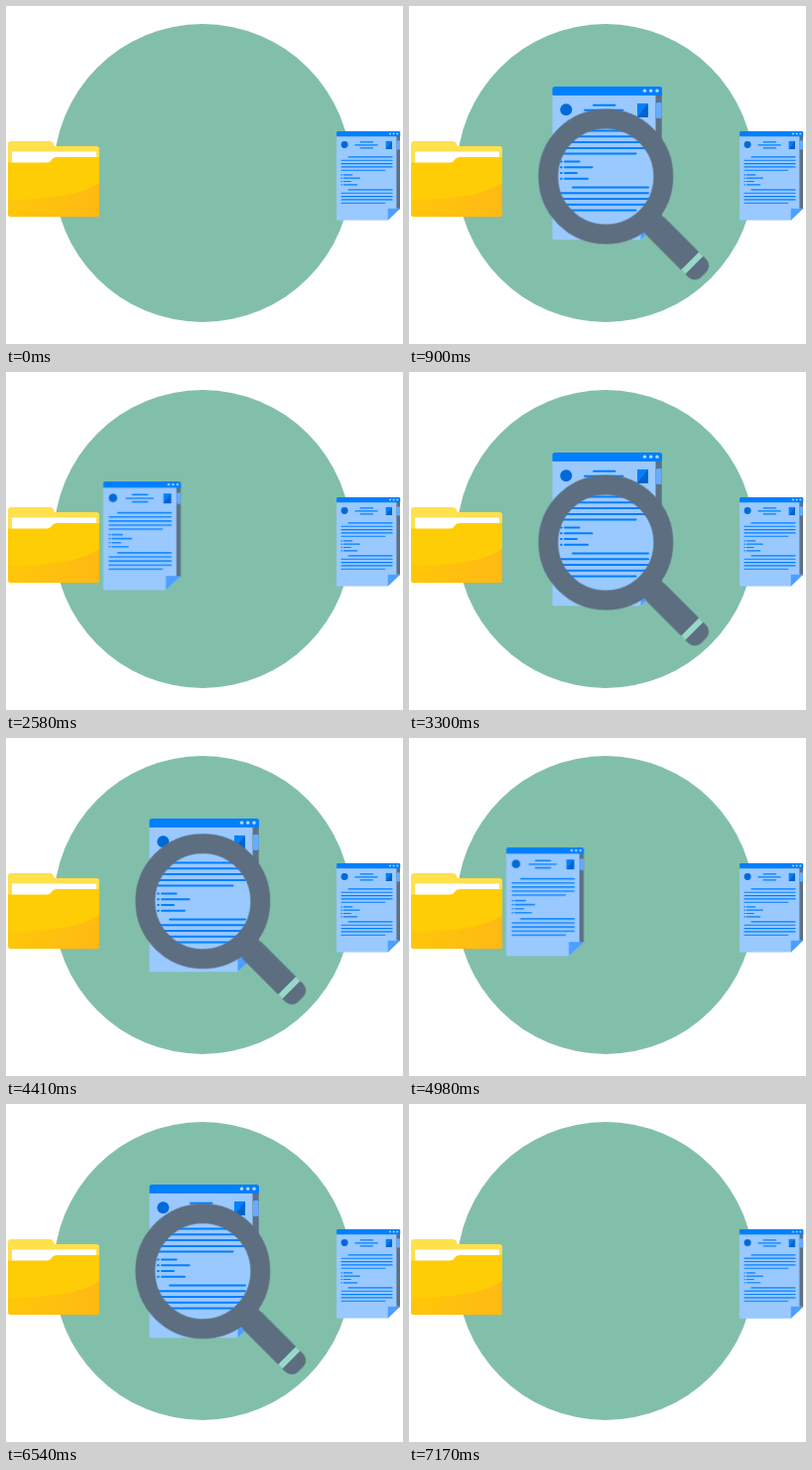
An HTML page that plays this animation: 400x340 px, repeating every 7200 ms.

```html
<!DOCTYPE html>
<html lang="en">
<head>
<meta charset="utf-8">
<title>Document search</title>
<style>
  html, body { margin: 0; width: 100%; height: 100%; overflow: hidden; background: #fff; }
  svg { display: block; width: 400px; height: 340px; }

  .doc { transform-origin: 199.5px 158px; }
  .filed { transform: translate(165.5px, 12.7px) scale(.58); }
  .moving { animation: travel 2400ms ease-in-out infinite, reveal 2400ms linear infinite; }
  .bob { animation: bob 2400ms ease-in-out infinite; }
  .pop { transform-origin: 216px 178px; animation: pop 2400ms ease-out infinite; }

  @keyframes travel {
    0% { transform: translate(-150px, 16px) scale(.3); }
    13.75%, 87.1% { transform: none; }
    98.75%, 100% { transform: translate(165.5px, 12.7px) scale(.58); }
  }
  @keyframes reveal {
    0% { opacity: 0; }
    3.75%, 100% { opacity: 1; }
  }
  @keyframes bob {
    0%, 12.5%, 50%, 87.5%, 100% { transform: translateY(0); }
    21.875%, 59.375% { transform: translateY(-13px); }
    40.625%, 78.125% { transform: translateY(13px); }
  }
  @keyframes pop {
    0%, 10% { opacity: 0; transform: translate(30px, 35px) scale(.7); }
    17%, 84% { opacity: 1; transform: none; }
    89%, 100% { opacity: 0; transform: translate(30px, 35px) scale(.7); }
  }
</style>
</head>
<body>
<svg viewBox="0 0 400 340">
  <defs>
    <linearGradient id="shade" x1="0" x2="1">
      <stop offset="0" stop-color="#ffc60a"/>
      <stop offset="1" stop-color="#ffb914"/>
    </linearGradient>
    <g id="page">
      <path d="M247 88h7.7v128h-7.7z" fill="#5c7185"/>
      <rect x="249" y="97" width="5.6" height="16" rx="1.5" fill="#66abff"/>
      <path d="M144.5 88h104v127h6.2L234 235.300H146q-1.500 0-1.500-1.500z" fill="#99c9ff"/>
      <path d="M233.500 215H254.800L233.500 235.300z" fill="#4d9fff"/>
      <path d="M144.500 90v-6.500q0-2.500 2.500-2.500h105.500q2.500 0 2.500 2.500V90z" fill="#007fff"/>
      <g fill="#b3d7ff">
        <circle cx="237.500" cy="85.300" r="1.700"/>
        <circle cx="243.700" cy="85.300" r="1.700"/>
        <circle cx="250" cy="85.300" r="1.700"/>
      </g>
      <circle cx="158.300" cy="104.300" r="6" fill="#0069d9"/>
      <path d="M230 98h10.800v14H230z" fill="#007fff"/>
      <path d="M240.800 98v14H230z" fill="#0062cc"/>
      <g stroke="#007fff" stroke-width="2" stroke-linecap="round">
        <path d="M186 99.700h21.500M177 104.800h38.500M186 110h21.500"/>
        <g id="para" fill="none">
          <path d="M165 125.500h76M153 131.300h88M153 137.100h88M153 142.900h88M153 148.600h75.500"/>
        </g>
        <use href="#para" y="56.900"/>
        <path d="M157 156.600h14.500M157 162.300h27.500M157 168h12M157 173.700h23"/>
        <path d="M153 156.600h.8M153 162.300h.8M153 168h.8M153 173.700h.8"/>
      </g>
    </g>
  </defs>

  <circle cx="198" cy="168" r="150" fill="#82bfab"/>

  <g>
    <path d="M2 160V139q0-3 3-3H44q3 0 4 2.800l.8 2.200H91q3 0 3 3v16z" fill="#ffe04d"/>
    <path d="M6 146.500h85V162H6z" fill="#fff"/>
    <path d="M2 157.500H41q3.500 0 4.800-2.500t4.700-3H94V209q0 3-3 3H5q-3 0-3-3z" fill="#ffcd05"/>
    <path d="M94 178C78 189 52 194 3 195L2 209q0 3 3 3H91q3 0 3-3z" fill="url(#shade)"/>
  </g>

  <use href="#page" class="doc filed"/>
  <use href="#page" class="doc moving"/>

  <g class="bob">
    <g class="pop">
      <g transform="translate(198.300 160) rotate(45)">
        <rect x="62" y="-12.700" width="77.500" height="25.400" rx="9" fill="#5c6e80"/>
        <path d="M120-12.700h6v25.400h-6z" fill="#98d8c8"/>
        <circle r="58" fill="none" stroke="#5c6e80" stroke-width="20"/>
      </g>
    </g>
  </g>
</svg>
</body>
</html>
```
